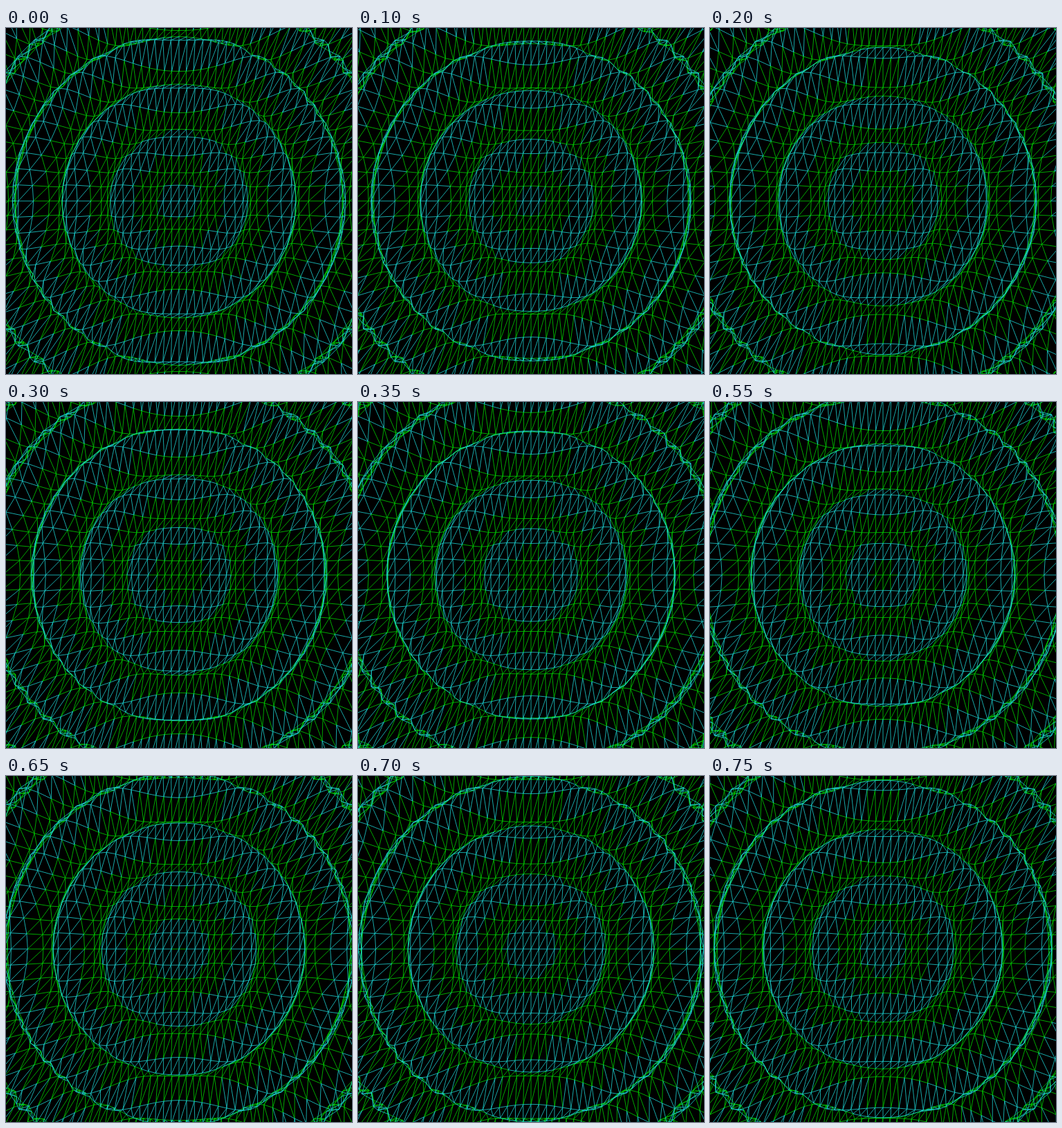
An HTML page with a canvas that plays this animation: 500 px wide and 500 px high, repeating every 0.8 s.

```html
<!DOCTYPE html>
<html>
<head>
<meta charset="utf-8">
<title>Ripple mesh</title>
<style>
  html, body { margin: 0; height: 100%; overflow: hidden; background: #000; }
  canvas { display: block; }
</style>
</head>
<body>
<canvas id="stage" width="500" height="500"></canvas>
<script>
const ctx = document.getElementById('stage').getContext('2d');
const LOOP = 800, STEP = 50;
const CELL_W = 500 / 46, CELL_H = 500 / 23, COLS = 27, ROWS = 14;
const WAVELENGTH = 69, FIRST_RING = 31, DEPTH = 0.067;
const GREEN = '#00d200', CYAN = '#1ed2d2';

// A rippling plane seen from above in perspective: crests move outward.
function project(col, row, progress) {
  const x = col * CELL_W, y = row * CELL_H;
  const phase = (FIRST_RING - Math.hypot(x, y)) / WAVELENGTH - progress;
  const height = Math.sin(phase * 2 * Math.PI);
  const scale = 1 / (1 - DEPTH * height);
  return { x: 250 + x * scale, y: 250 + y * scale, height };
}

function draw(progress) {
  const green = new Path2D(), cyan = new Path2D();
  const edge = (a, b) => {
    const path = a.height + b.height > 0 ? cyan : green;
    path.moveTo(a.x, a.y);
    path.lineTo(b.x, b.y);
  };

  let above = null;
  for (let row = -ROWS; row <= ROWS; row++) {
    const points = [];
    for (let col = -COLS; col <= COLS; col++) {
      points.push(project(col, row, progress));
    }
    points.forEach((point, i) => {
      const next = points[i + 1];
      if (next) edge(point, next);
      if (above) {
        edge(point, above[i]);
        if (next) edge(point, above[i + 1]);
      }
    });
    above = points;
  }

  ctx.fillStyle = '#000';
  ctx.fillRect(0, 0, 500, 500);
  ctx.lineWidth = 0.8;
  ctx.strokeStyle = GREEN;
  ctx.stroke(green);
  ctx.strokeStyle = CYAN;
  ctx.stroke(cyan);
}

function tick() {
  const time = performance.now() % LOOP;
  draw(Math.floor(time / STEP) * STEP / LOOP);
  requestAnimationFrame(tick);
}
tick();
</script>
</body>
</html>
```
